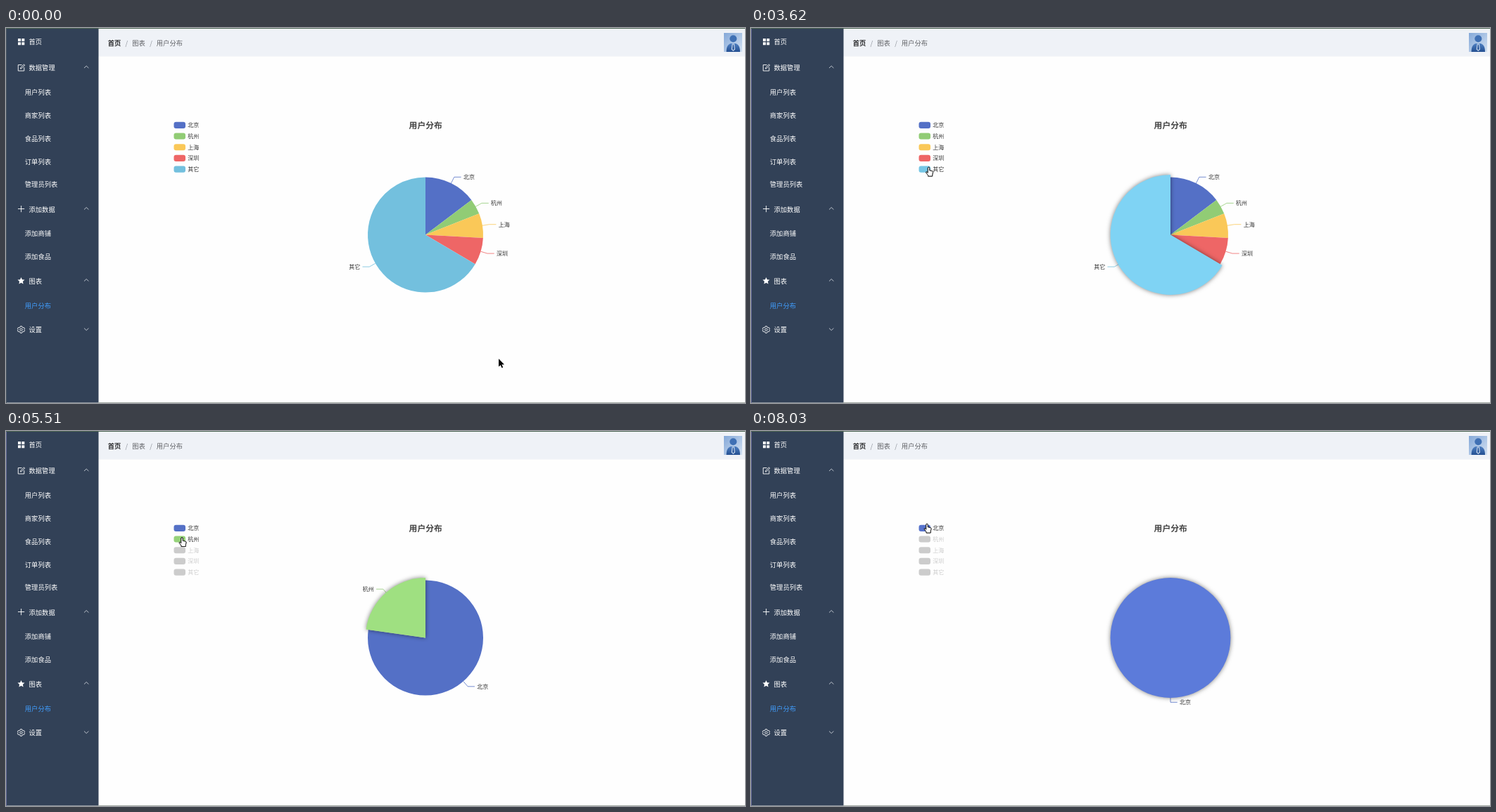
An HTML page with a canvas that plays this animation: 1050x534 px, repeating every 8.84 s.

```html
<!DOCTYPE html>
<html lang="zh-CN">
<head>
<meta charset="utf-8">
<style>
  html, body { margin: 0; width: 100%; height: 100%; overflow: hidden; background: #fefefe; }
  svg, canvas { position: absolute; left: 0; top: 0; width: 1050px; height: 534px; }
  text { font-family: "Noto Sans CJK SC", "Noto Sans CJK JP", "Noto Sans CJK", sans-serif; font-size: 9.3px; }
</style>
</head>
<body>
<svg viewBox="0 0 1050 534">
  <defs>
    <linearGradient id="sky" x2="1" y2="1"><stop stop-color="#84a8d8"/><stop offset="1" stop-color="#d3e1f2"/></linearGradient>
    <linearGradient id="suit" x2="0" y2="1"><stop stop-color="#4f80c2"/><stop offset="1" stop-color="#234f91"/></linearGradient>
  </defs>
  <path fill="#eff2f7" d="M131 0H1050V40.5H131z"/>
  <path fill="#324157" d="M0 0H131.5V534H0z"/>
  <path fill="#4d6553" d="M0 0H1050V1H0z"/>
  <path fill="#a3aaa4" d="M131 533H1050V534H131z"/>
  <path fill="#8b949c" d="M0 533H131V534H0z"/>
  <path id="edge" d="M0 1H1V534H0z"/>

  <g fill="#fff">
    <path d="M17 15h4v4h-4zM22.3 15h4v4h-4zM17 20.3h4v4h-4zM22.3 20.3h4v4h-4z"/>
    <path d="M21.5 355l1.5 3.2 3.5.4-2.6 2.4.7 3.5-3.1-1.7-3.1 1.7.7-3.5-2.6-2.4 3.5-.4z"/>
  </g>
  <g fill="none" stroke="#fff" stroke-width=".9">
    <path d="M22.5 52.5H17.3V61H25.8V56M20.5 58l.4-1.6 4.6-4.6 1.2 1.2-4.6 4.6z"/>
    <path d="M17 257.5h9.2M21.6 253v9.2"/>
    <path d="M20 426l.5-1.3h2l.5 1.3 1.2.7 1.4-.2 1 1.8-.9 1.2.9 1.2-1 1.8-1.4-.2-1.2.7-.5 1.3h-2l-.5-1.3-1.2-.7-1.4.2-1-1.8.9-1.2-.9-1.2 1-1.8 1.4.2z"/>
    <circle cx="21.5" cy="429.5" r="1.7"/>
    <path stroke="#dde2e9" stroke-width=".8" d="M111 57l3.2-3 3.2 3M111 258.5l3.2-3 3.2 3M111 360.5l3.2-3 3.2 3M111 427.5l3.2 3 3.2-3"/>
  </g>
  <g id="labels"></g>

  <path fill="url(#sky)" d="M1020 7h26v27h-26z"/>
  <circle cx="1033.3" cy="15.3" r="5" fill="#3f70b4"/>
  <path fill="url(#suit)" d="M1023.5 34c0-8 3-11.5 7-12h5.500c4 .5 7 4 7 12z"/>
  <path fill="#dce8f6" d="M1031.700 22.500h3.200l1 8-2.600 2.500-2.600-2.500z"/>
  <path fill="#2d5a9e" d="M1032.600 23.500h1.400l.8 6.500-1.500 1.700-1.500-1.700z"/>
</svg>
<canvas id="stage" width="1050" height="534"></canvas>

<script>
const LOOP = 8840, TAU = Math.PI * 2;
const CX = 596, CY = 294.5, R = 82;
const FONT = 'px "Noto Sans CJK SC", "Noto Sans CJK JP", "Noto Sans CJK", sans-serif';
const ctx = document.getElementById('stage').getContext('2d');
const edge = document.getElementById('edge');

const cities = [
  { name: '北京', value: 9680, rgb: [84, 112, 198] },
  { name: '杭州', value: 2850, rgb: [145, 204, 117] },
  { name: '上海', value: 4540, rgb: [250, 200, 88] },
  { name: '深圳', value: 5027, rgb: [238, 102, 102] },
  { name: '其它', value: 43903, rgb: [115, 192, 222] },
];

// Sidebar, breadcrumb and title: [text, x, centre y, colour, extra attributes]
const side = [
  ['首页', 32.5, 19.5], ['数据管理', 32.5, 56.5], ['用户列表', 26.8, 91], ['商家列表', 26.8, 124.5],
  ['食品列表', 26.8, 157], ['订单列表', 26.8, 190], ['管理员列表', 26.8, 222.8], ['添加数据', 32.5, 258],
  ['添加商铺', 26.8, 292.7], ['添加食品', 26.8, 325], ['图表', 32.5, 360.3],
  ['用户分布', 26.8, 395, '#409eff'], ['设置', 32.5, 429.8],
  ['首页', 144.8, 21, '#303133', 'font-weight="700"'], ['/', 169.5, 21, '#8f949c'], ['图表', 179.3, 21, '#606266'],
  ['/', 204.3, 21, '#8f949c'], ['用户分布', 213.8, 21, '#606266'],
  ['用户分布', 572.6, 139, '#464646', 'font-weight="700" style="font-size:11.8px"'],
];
document.getElementById('labels').innerHTML = side.map(([s, x, y, color = '#fff', more = '']) =>
  `<text x="${x}" y="${y + (more.includes('11.8') ? 4.4 : 3.5)}" fill="${color}" ${more}>${s}</text>`).join('');

// The screen refreshes in bursts: [first, last, refreshes]
const bursts = [[310, 1300, 8], [1420, 2420, 8], [2540, 3470, 8], [3620, 4580, 8],
  [4700, 5660, 8], [5780, 6470, 6], [6870, 7020, 2], [7670, 8030, 4]];

// Pointer path: [time, x, y]
const path = [[310, 700, 471], [700, 645, 440], [900, 605, 372], [1300, 575, 310], [1560, 597, 284],
  [1690, 636, 264], [1780, 650, 273], [1990, 655, 285], [2134, 655, 312.5], [2420, 645, 322],
  [2540, 615, 345], [2700, 570, 340], [2850, 500, 310], [3250, 300, 222], [3400, 257, 203],
  [3520, 252.500, 198.500], [3800, 252.500, 198.500], [4080, 252.500, 190], [4640, 252, 188.500],
  [4820, 251, 173], [5130, 250, 170], [5270, 250, 152], [5640, 250, 152], [5950, 249, 141],
  [6450, 249, 132.500], [7670, 249, 132.500], [8030, 250, 132.500]];

// Highlighted slice from a given time on
const hovers = [[0, -1], [870, 4], [1560, 0], [1690, 1], [1780, 2], [2010, 3], [2470, 4], [2760, -1],
  [3220, 4], [3750, -1], [4080, 3], [4640, -1], [4820, 2], [5130, -1], [5240, 1], [5640, -1],
  [5950, 0], [6850, -1], [7680, 0]];

// Legend clicks: [time, toggled slice]
const clicks = [[3750, 4], [4640, 3], [5130, 2], [5640, 1], [6850, 0], [7650, 0]];

const clamp = v => Math.max(0, Math.min(1, v));
const lerp = (a, b, p) => a + (b - a) * p;
const inOut = p => p < .5 ? 4 * p ** 3 : 1 - 4 * (1 - p) ** 3;
const rgb = c => `rgb(${c.map(Math.round)})`;

function refresh(t) {
  let shown = 0;
  for (const [a, b, n] of bursts) {
    const step = (b - a) / (n - 1);
    if (t >= a) shown = a + step * Math.min(n - 1, Math.floor((t - a + 15) / step));
  }
  return shown;
}

function pointer(t) {
  const k = path.findIndex(p => p[0] > t);
  if (k === 0) return path[0].slice(1);
  if (k < 0) return path[path.length - 1].slice(1);
  const [a, b] = [path[k - 1], path[k]], p = (t - a[0]) / (b[0] - a[0]);
  return [lerp(a[1], b[1], p), lerp(a[2], b[2], p)];
}

const hovered = t => hovers.filter(h => h[0] <= t).pop()[1];

function emphasis(i, t) {
  let v = 0;
  hovers.forEach(([start, id], k) => {
    if (start > t) return;
    const end = Math.min(t, hovers[k + 1] ? hovers[k + 1][0] : LOOP);
    v = clamp(v + (id === i ? 1 : -1) * (end - start) / 300);
  });
  return 1 - (1 - v) ** 3;
}

function layout(on) {
  const total = cities.reduce((sum, c, i) => sum + (on[i] ? c.value : 0), 0);
  let angle = 0;
  return cities.map((c, i) => on[i] ? [angle, angle += c.value / total * TAU] : null);
}

function chartState(t) {
  let on = cities.map(() => true), before = on, since = -1e4;
  for (const [time, i] of clicks) {
    if (time > t) break;
    before = on;
    on = on.map((v, k) => k === i ? !v : v);
    since = time;
  }
  const from = layout(before), to = layout(on);
  const p = inOut(clamp((t - since) / 300)), fade = 1 - clamp((t - since) / 160);
  const slices = cities.map((c, i) => {
    const a = from[i], b = to[i];
    if (!a && !b) return null;
    const s = { ...c, i, alpha: b ? 1 : fade, lift: emphasis(i, t) };
    if (!b) [s.start, s.end] = a;
    else {
      const [a0, a1] = a || [b[0], b[0]];
      s.start = lerp(a0, b[0], p);
      s.end = lerp(a1, b[1], p);
    }
    return s;
  }).filter(s => s && s.alpha > 0);
  return { on, slices };
}

function write(s, x, y, size, color, align = 'left', weight = '') {
  ctx.font = `${weight} ${size}${FONT}`;
  ctx.textAlign = align;
  ctx.fillStyle = color;
  ctx.fillText(s, x, y + size * .37);
}

function drawLabel(s) {
  const mid = (s.start + s.end) / 2, dx = Math.sin(mid), dy = -Math.cos(mid);
  const side = dx > -1e-6 ? 1 : -1;
  const x = CX + dx * (R + 9.8), y = CY + dy * (R + 9.8);
  ctx.globalAlpha = s.alpha;
  ctx.strokeStyle = rgb(s.rgb);
  ctx.lineWidth = .8;
  ctx.beginPath();
  ctx.moveTo(CX + dx * R, CY + dy * R);
  ctx.lineTo(x, y);
  ctx.lineTo(x + side * 9.8, y);
  ctx.stroke();
  write(s.name, x + side * 13.1, y, 8, '#333', side > 0 ? 'left' : 'right');
  ctx.globalAlpha = 1;
}

function drawSlice(s) {
  ctx.save();
  ctx.globalAlpha = s.alpha;
  ctx.fillStyle = rgb(s.rgb.map(c => Math.min(255, c * (1 + .1 * s.lift))));
  ctx.shadowColor = `rgba(0,0,0,${.5 * s.lift})`;
  ctx.shadowBlur = 6.5 * s.lift;
  ctx.beginPath();
  if (s.end - s.start < TAU - 1e-4) ctx.moveTo(CX, CY);
  ctx.arc(CX, CY, R + 3.4 * s.lift, s.start - TAU / 4, s.end - TAU / 4);
  ctx.fill();
  ctx.restore();
}

function drawPie({ on, slices }) {
  if (!on.includes(true)) {
    ctx.fillStyle = '#cfcfd1';
    ctx.beginPath();
    ctx.arc(CX, CY, R, 0, TAU);
    ctx.fill();
  }
  slices.forEach(drawLabel);
  slices.sort((a, b) => (a.lift > 0) - (b.lift > 0) || a.i - b.i).forEach(drawSlice);
}

function drawLegend(on, t) {
  cities.forEach((c, i) => {
    const y = 138.3 + i * 15.72, lift = on[i] ? emphasis(i, t) : 0;
    ctx.fillStyle = on[i] ? rgb(c.rgb.map(v => Math.min(255, v * (1 + .03 * lift)))) : '#ccc';
    ctx.beginPath();
    ctx.roundRect(238.5, y - 4.6, 16.500, 9.2, 3);
    ctx.fill();
    write(c.name, 258.2, y, 8, on[i] ? '#333' : '#ccc');
  });
}

function drawTip(t) {
  const alpha = clamp((t - 870) / 200) * (1 - clamp((t - 2860) / 200));
  if (!alpha) return;
  const c = cities[t < 2760 ? hovered(t) : 4], color = rgb(c.rgb);
  const [px, py] = pointer(Math.min(t, 2760) - 90), x = px + 12.5, y = py + 12;
  const value = c.value.toLocaleString('en-US');
  ctx.save();
  ctx.globalAlpha = alpha;
  ctx.font = '700 10' + FONT;
  const w = 56 + ctx.measureText(value).width;
  ctx.beginPath();
  ctx.roundRect(x, y, w, 39.500, 2.600);
  ctx.shadowColor = 'rgba(0,0,0,.2)';
  ctx.shadowBlur = 6.5;
  ctx.shadowOffsetX = .7;
  ctx.shadowOffsetY = 1.3;
  ctx.fillStyle = '#fff';
  ctx.fill();
  ctx.shadowColor = 'transparent';
  ctx.strokeStyle = color;
  ctx.lineWidth = .8;
  ctx.stroke();
  write('用户分布', x + 6.700, y + 12, 9.3, '#666');
  ctx.fillStyle = color;
  ctx.beginPath();
  ctx.arc(x + 10.300, y + 28, 3.300, 0, TAU);
  ctx.fill();
  write(c.name, x + 17, y + 28, 9.3, '#666');
  write(value, x + w - 7, y + 28, 10, '#666', 'right', '700');
  ctx.restore();
}

const arrow = new Path2D('M0 0V11.300L2.600 8.900 4.500 13 6.200 12.200 4.400 8.200H8z');
const hand = new Path2D('M-1.200 1Q-1.200 -.3 0 -.3T1.200 1V4.300L5 5.200Q6.300 5.700 6 7L5.200 10.500V12.500H-1V11L-3.700 7.500Q-4.100 6 -2.700 6.300L-1.200 7.800z');

function drawPointer(t) {
  const isHand = t > 870 && t < 2760 || t > 3220;
  ctx.save();
  ctx.translate(...pointer(t));
  ctx.fillStyle = isHand ? '#fff' : '#000';
  ctx.strokeStyle = isHand ? '#000' : '#fff';
  ctx.lineWidth = .8;
  const shape = isHand ? hand : arrow;
  ctx.stroke(shape);
  ctx.fill(shape);
  if (isHand) ctx.stroke(shape);
  ctx.restore();
}

const origin = performance.now();
function draw() {
  const t = refresh((performance.now() - origin) % LOOP), state = chartState(t);
  ctx.clearRect(0, 0, 1050, 534);
  edge.setAttribute('fill', t < 3620 ? '#4a5663' : '#6a6f9c');
  drawPie(state);
  drawLegend(state.on, t);
  drawTip(t);
  drawPointer(t);
  requestAnimationFrame(draw);
}
draw();
</script>
</body>
</html>
```
